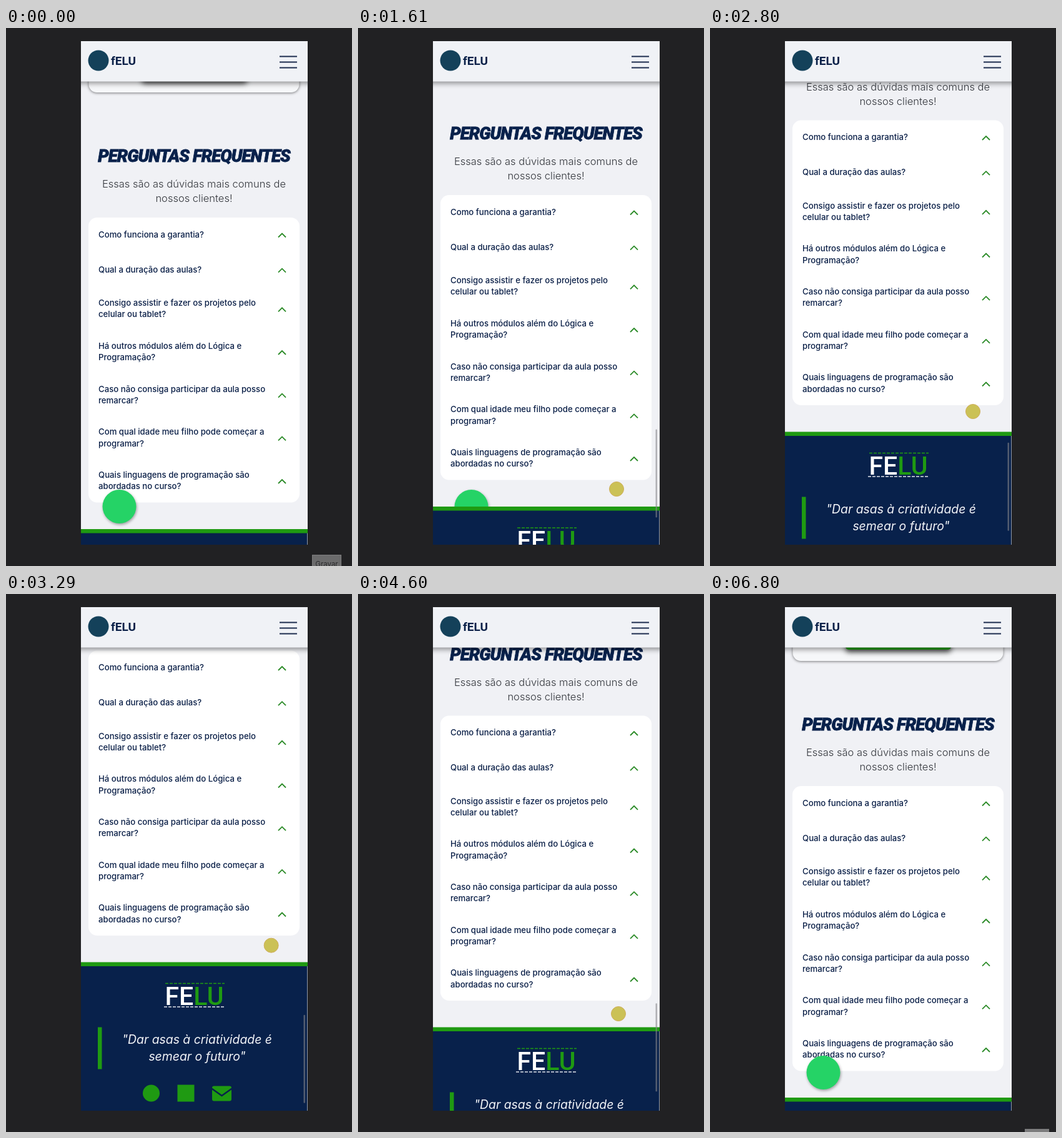
Write an HTML page that moves like this. It is 554 px wide and 860 px high and loops after 6.87 s.

```html
<!DOCTYPE html>
<html lang="pt-BR">
<head>
<meta charset="utf-8">
<title>Perguntas frequentes</title>
<style>
  html, body { margin: 0; width: 100%; height: 100%; overflow: hidden; background: #212123; }
  svg { display: block; width: 554px; height: 860px; font-family: Inter, sans-serif; }
  #phone { clip-path: inset(0); }
  .title { font: italic 900 27.5px Roboto, sans-serif; letter-spacing: -.9px; fill: #08214b; stroke: #08214b; stroke-width: .8; }
  .lead { font-size: 16.5px; font-weight: 300; fill: #33363c; }
  .ask { font-size: 13.2px; font-weight: 500; fill: #0a1f47; }
  .quote { font-size: 19.4px; font-style: italic; fill: #f2f4f8; }
  .brand { font: 700 19px Roboto, sans-serif; fill: #0b2149; }
  .word { font: 500 41px Roboto, sans-serif; }
  .mid { text-anchor: middle; }
  .up { fill: none; stroke: #2a8a26; stroke-width: 1.8; }
  .card { filter: drop-shadow(0 1px 2px rgba(0,0,0,.5)); }
  .cta { filter: drop-shadow(0 4px 4px rgba(0,0,0,.7)); }
  .head { filter: drop-shadow(0 3px 4px rgba(0,0,0,.42)); }
  .chat { filter: drop-shadow(1px 2px 2px rgba(0,0,0,.35)); }
</style>
</head>
<body>
<svg viewBox="0 0 554 860">
  <defs><clipPath id="screen"><rect x="120" y="21" width="363" height="805"/></clipPath></defs>
  <rect width="554" height="860" fill="#212123"/>
  <g clip-path="url(#screen)">
    <rect x="120" y="21" width="363" height="805" fill="#f0f1f5"/>

    <g class="scroll">
      <rect class="card" x="132.5" y="-400" width="337" height="200" rx="13" fill="#f6f7f9"/>
      <rect class="cta" x="217" y="-262" width="169" height="44" rx="5" fill="#1f9a12"/>
      <text class="title mid" x="301" y="-89">PERGUNTAS FREQUENTES</text>
      <text class="lead mid" x="301" y="-48">Essas são as dúvidas mais comuns de</text>
      <text class="lead mid" x="301" y="-25">nossos clientes!</text>
      <rect x="132" y="0" width="338" height="455.5" rx="14" fill="#fff"/>
      <g id="faq"></g>
    </g>

    <circle class="chat" cx="181.5" cy="765" r="27" fill="#25d366"/>

    <g class="scroll">
      <rect x="120" y="498" width="363" height="7" fill="#1f9a12"/>
      <rect x="120" y="504.5" width="362" height="400" fill="#08214b"/>
      <rect x="482" y="504.5" width="1" height="400" fill="#8d97a8"/>
      <path d="M255 532H350" stroke="#1f9a12" stroke-width="1.5" stroke-dasharray="5 2"/>
      <text class="word mid" x="301.5" y="566" fill="#fff">FE<tspan fill="#1f9a12">LU</tspan></text>
      <path d="M253 569.5H351" stroke="#dfe4ec" stroke-width="1.5" stroke-dasharray="5 2"/>
      <rect x="147" y="602" width="6.5" height="67" fill="#1f9a12"/>
      <text class="quote mid" x="306" y="628">"Dar asas à criatividade é</text>
      <text class="quote mid" x="306" y="655">semear o futuro"</text>
      <g fill="#1f9a12">
        <circle cx="232.5" cy="707.5" r="13.5"/>
        <rect x="274.5" y="694" width="27" height="27"/>
        <path d="M333 696h25q3 0 3 3l-15.500 11-15.500-11q0-3 3-3z"/>
        <path d="M330 702l15.500 11 15.500-11v15q0 3-3 3h-25q-3 0-3-3z"/>
      </g>
    </g>

    <g class="head"><rect x="110" y="11" width="383" height="74.500" fill="#f0f2f6"/></g>
    <circle cx="148" cy="52" r="16.500" fill="#14415a"/>
    <text class="brand" x="168" y="59">fELU</text>
    <path d="M438 45.500H466M438 54.500H466M438 63.500H466" stroke="#1d2c4e" stroke-width="2"/>

    <rect id="bar" x="476.500" width="2.500" height="141" rx="1.200" fill="#858589"/>
    <circle id="dot" r="11.500" fill="#c6b93e" fill-opacity=".87" stroke="#cfae5c" stroke-width="1"/>
  </g>

  <g id="rec">
    <rect x=".5" y=".5" width="46" height="24" fill="#6b6b6c" stroke="#7d7d7e"/>
    <text class="mid" x="23.500" y="19" font-size="11.500" fill="#2c2c2e">Gravar</text>
  </g>
  <rect id="rec2" x="504" width="39" height="10" fill="#7c7c7d"/>
</svg>
<script>
const LOOP = 6870, STEP = 70;
const $ = id => document.getElementById(id);

// row centre, then its lines
const faq = [
  [27.5, "Como funciona a garantia?"],
  [83.7, "Qual a duração das aulas?"],
  [146.3, "Consigo assistir e fazer os projetos pelo", "celular ou tablet?"],
  [215, "Há outros módulos além do Lógica e", "Programação?"],
  [283.7, "Caso não consiga participar da aula posso", "remarcar?"],
  [352.4, "Com qual idade meu filho pode começar a", "programar?"],
  [421, "Quais linguagens de programação são", "abordadas no curso?"]
];
$("faq").innerHTML = faq.map(([y, ...lines]) =>
  lines.map((s, i) => {
    const base = y + 4 + (i - (lines.length - 1) / 2) * 18.3;
    return `<text class="ask" x="148" y="${base}">${s}</text>`;
  }).join("") +
  `<path class="up" d="M436 ${y + 4}l6-6 6 6"/>`
).join("");

// time, scroll position, pointer x, pointer y
const keys = [
  [0, 303, 455, 755],
  [380, 303, 455, 755],
  [1050, 303, 427, 784],
  [1120, 301, 425, 771],
  [1610, 267, 414, 737],
  [2100, 222, 416, 690],
  [2800, 147.5, 421, 613],
  [3150, 98, 424, 567],
  [3360, 87, 425, 559],
  [3490, 87, 425, 559],
  [3700, 81, 424, 555],
  [3830, 81, 424, 555],
  [4040, 113.5, 423, 589],
  [4600, 194.5, 417, 671],
  [5230, 279, 405, 752],
  [5440, 299, 399, 773],
  [5600, 305, 405, 790],
  [5860, 307, 440, 842],
  [LOOP, 307, 440, 842]
];

function sample(t) {
  const i = Math.max(1, keys.findIndex(k => k[0] > t));
  const a = keys[i - 1], b = keys[i];
  const f = (t - a[0]) / (b[0] - a[0]);
  return [1, 2, 3].map(n => a[n] + (b[n] - a[n]) * f);
}

function snap(t) {
  const from = t < 3560 ? 0 : t < 3900 ? 3560 : 3900;
  return from + Math.floor((t - from) / STEP) * STEP;
}

const layers = document.querySelectorAll(".scroll");
const show = (el, on) => el.setAttribute("visibility", on ? "visible" : "hidden");

function draw(t) {
  const [y, px, py] = sample(snap(t));
  layers.forEach(g => g.setAttribute("transform", `translate(0 ${Math.round(y * 2) / 2})`));

  $("dot").setAttribute("cx", px);
  $("dot").setAttribute("cy", py);
  show($("dot"), t >= 380 && t < 5920);

  $("bar").setAttribute("y", 641.5 + (267 - y) * 0.177);
  $("bar").setAttribute("opacity", t < 6060 ? 0.6 : 0.3);
  show($("bar"), t >= 1120 && t < 6200);

  $("rec").setAttribute("transform", "translate(490 842)");
  show($("rec"), t < 70);
  $("rec2").setAttribute("y", t < 6800 ? 857 : 855);
  show($("rec2"), t >= 6730);
}

const start = performance.now();
function tick() {
  draw((performance.now() - start) % LOOP);
  requestAnimationFrame(tick);
}
tick();
</script>
</body>
</html>
```
